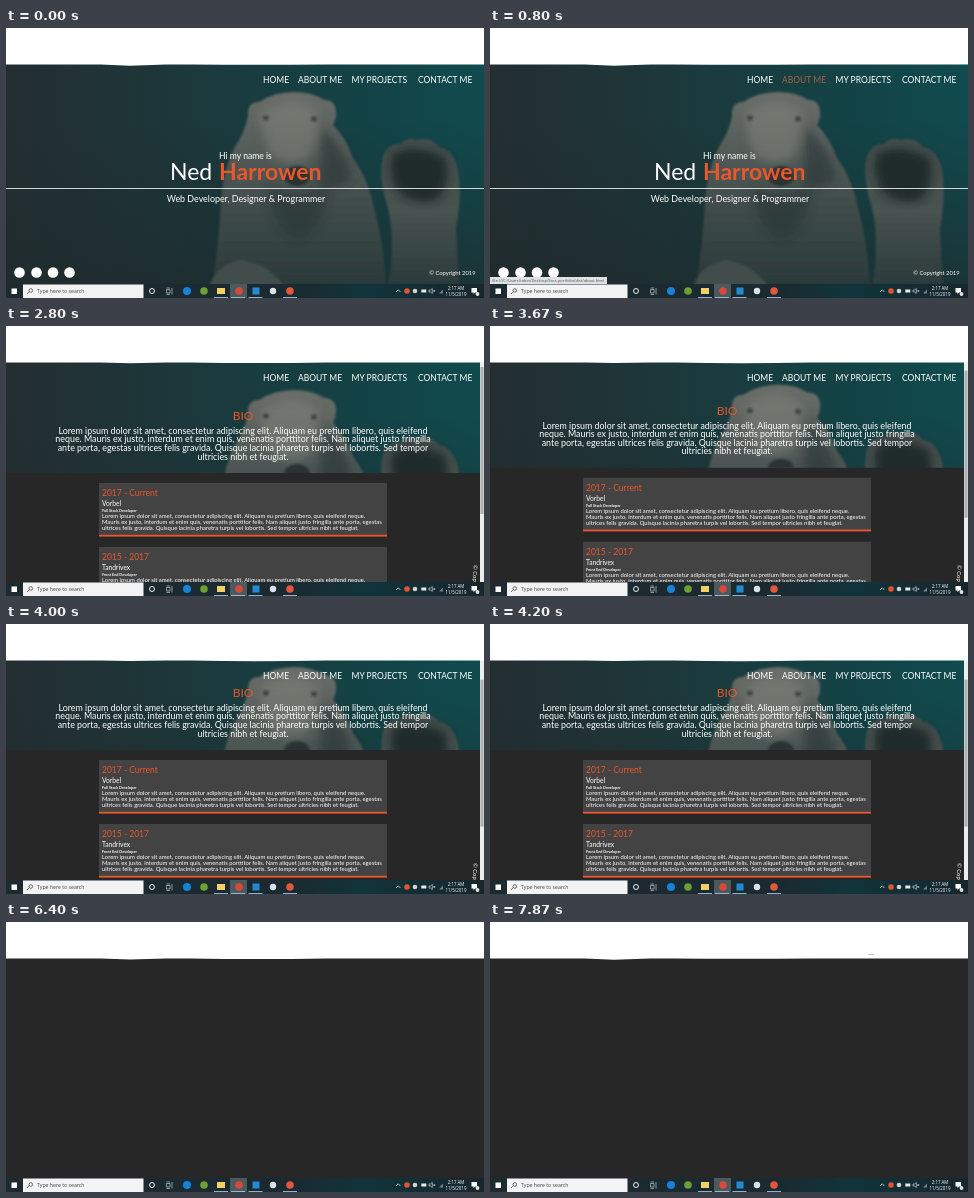
Animation of 478x270 px, one loop 8000 ms. Source, as an HTML page:

```html
<!DOCTYPE html>
<html lang="en">
<head>
<meta charset="utf-8">
<title>Portfolio walkthrough</title>
<style>
html, body { margin: 0; width: 100%; height: 100%; overflow: hidden; background: #272727; }
svg { display: block; width: 100vw; height: 100vh; font-family: Lato, "Open Sans", sans-serif; fill: #fff; }
.ui { font-family: "Open Sans", "Noto Sans", sans-serif; }
</style>
</head>
<body>
<svg id="stage" viewBox="0 0 478 270">
  <defs>
    <linearGradient id="water">
      <stop offset="0" stop-color="#242e31"/>
      <stop offset=".35" stop-color="#1d373a"/>
      <stop offset=".75" stop-color="#134346"/>
      <stop offset="1" stop-color="#104b4e"/>
    </linearGradient>
    <linearGradient id="depth" x2="0" y2="1">
      <stop offset=".25" stop-color="#1e2a2c" stop-opacity="0"/>
      <stop offset="1" stop-color="#1e2a2c" stop-opacity=".7"/>
    </linearGradient>
    <linearGradient id="fur" x2="0" y2="1">
      <stop offset="0" stop-color="#6a6e69"/>
      <stop offset=".35" stop-color="#505956"/>
      <stop offset=".65" stop-color="#3d4948"/>
      <stop offset="1" stop-color="#2b393a"/>
    </linearGradient>
    <linearGradient id="arm" x2="0" y2="1">
      <stop offset="0" stop-color="#454f4d"/>
      <stop offset=".5" stop-color="#48524f"/>
      <stop offset="1" stop-color="#2b3a3b"/>
    </linearGradient>
    <linearGradient id="bar">
      <stop offset="0" stop-color="#1d2a30"/>
      <stop offset=".6" stop-color="#1a2a30"/>
      <stop offset=".75" stop-color="#10343a"/>
      <stop offset="1" stop-color="#17262d"/>
    </linearGradient>
    <filter id="soft" x="-20%" y="-20%" width="140%" height="140%"><feGaussianBlur stdDeviation="1.2"/></filter>
    <filter id="haze" x="-30%" y="-30%" width="160%" height="160%"><feGaussianBlur stdDeviation="5"/></filter>
    <clipPath id="view"><path d="M0 36H478V256H0z"/></clipPath>
    <clipPath id="banner"><path d="M0 36H478V147H0z"/></clipPath>
    <g id="photo">
      <path fill="url(#water)" d="M0 36H478V256H0z"/>
      <path fill="url(#depth)" d="M0 36H478V256H0z"/>
      <g filter="url(#soft)">
        <path fill="url(#fur)" d="M242 88Q241 74 253 74Q268 64 288 64Q306 64 318 72Q328 71 330 82Q331 90 327 97Q340 110 347 130Q362 150 368 180Q378 215 380 258H206Q213 215 215 175Q217 140 230 117Q239 104 242 88z"/>
        <path fill="url(#arm)" d="M382 258Q390 215 382 180Q372 150 377 128Q382 115 394 116Q400 109 411 112Q424 108 433 119Q447 121 452 142Q456 170 450 200L453 258z"/>
        <path fill="#4b5653" opacity=".7" d="M203 258Q210 238 235 232Q262 236 278 258z"/>
      </g>
      <g filter="url(#haze)">
        <path fill="#83857d" opacity=".5" d="M256 84Q288 64 312 84Q312 115 300 132Q280 140 266 128Q254 108 256 84z"/>
        <path fill="#263233" opacity=".6" d="M314 98Q340 120 346 150Q330 165 312 156Q318 125 314 98z"/>
        <path fill="#263233" opacity=".5" d="M262 158Q290 175 322 158Q320 200 292 212Q264 200 262 158z"/>
        <path fill="#1b2527" opacity=".85" d="M386 126Q410 114 440 130Q446 158 430 172Q404 178 390 160Q382 144 386 126z"/>
      </g>
      <g filter="url(#soft)" fill="#20292a">
        <ellipse cx="291" cy="148" rx="13" ry="10" opacity=".75"/>
        <ellipse cx="260" cy="90" rx="3" ry="2.5" opacity=".6"/>
        <ellipse cx="308" cy="91" rx="3" ry="2.5" opacity=".6"/>
      </g>
    </g>
  </defs>
  <path fill="#272727" d="M0 0H478V270H0z"/>
  <g clip-path="url(#view)">
    <g id="home"><use href="#photo"/><path fill-opacity=".8" d="M0 160H478V161H0z"/></g>
    <g id="about"><g id="scroll"><use href="#photo" clip-path="url(#banner)"/></g></g>
    <g id="nav"></g>
    <g id="track"><path fill="#eceeee" d="M474 36H478V256H474z"/><rect id="thumb" x="474.4" width="3.2" height="147" fill="#aeb1b1"/></g>
    <g id="status" class="ui"><path fill="#dfe1e2" d="M0 249H117V256H0z"/></g>
  </g>
  <path id="edge"/>
  <path id="dash" stroke="#aaa" stroke-width=".7" d="M378 32.5H384"/>
  <g id="task" class="ui"><path fill="url(#bar)" d="M0 256H478V270H0z"/></g>
</svg>
<script>
const LOOP = 8000, ORANGE = '#e9572b', SVG = 'http://www.w3.org/2000/svg';
const ABOUT_AT = 2100, PROJECTS_AT = 5650;
const $ = id => document.getElementById(id);

function add(parent, tag, attrs, content) {
  const el = document.createElementNS(SVG, tag);
  for (const k in attrs) el.setAttribute(k, attrs[k]);
  if (content) el.textContent = content;
  return parent.appendChild(el);
}
const text = (parent, x, y, size, str, more) =>
  add(parent, 'text', { x, y, 'font-size': size, ...more }, str);
const rect = (parent, x, y, width, height, fill) =>
  add(parent, 'rect', { x, y, width, height, fill });
const dot = (parent, cx, cy, r, fill) => add(parent, 'circle', { cx, cy, r, fill });
const line = (parent, d, stroke, width) =>
  add(parent, 'path', { d, fill: 'none', stroke, 'stroke-width': width });
const mid = { 'text-anchor': 'middle' };

// Home page
const home = $('home');
text(home, 213, 131, 8.6, 'Hi my name is');
text(home, 164, 152, 23, 'Ned');
text(home, 213, 152, 23, 'Harrowen', { fill: ORANGE, 'font-weight': 700 });
text(home, 240, 173.7, 8.9, 'Web Developer, Designer & Programmer', mid);
text(home, 469.5, 247, 5.8, '© Copyright 2019', { 'text-anchor': 'end' });
[13.5, 30.5, 47, 63.5].forEach(x => dot(home, x, 244.5, 5.3, '#fff'));

// About page
const page = $('scroll');
text(page, 237, 94, 12, 'BIO', { ...mid, fill: ORANGE });
[
  'Lorem ipsum dolor sit amet, consectetur adipiscing elit. Aliquam eu pretium libero, quis eleifend',
  'neque. Mauris ex justo, interdum et enim quis, venenatis porttitor felis. Nam aliquet justo fringilla',
  'ante porta, egestas ultrices felis gravida. Quisque lacinia pharetra turpis vel lobortis. Sed tempor',
  'ultricies nibh et feugiat.'
].forEach((str, i) => text(page, 237, 107.8 + i * 8.6, 8.9, str, mid));

const blurb = [
  'Lorem ipsum dolor sit amet, consectetur adipiscing elit. Aliquam eu pretium libero, quis eleifend neque.',
  'Mauris ex justo, interdum et enim quis, venenatis porttitor felis. Nam aliquet justo fringilla ante porta, egestas',
  'ultrices felis gravida. Quisque lacinia pharetra turpis vel lobortis. Sed tempor ultricies nibh et feugiat.'
];
[
  ['2017 - Current', 'Vorbel', 'Full Stack Developer'],
  ['2015 - 2017', 'Tandrivex', 'Front End Developer'],
  ['2012 - 2015', 'Orl Velden Co.', 'Graphic Designer']
].forEach(([years, firm, role], i) => {
  const y = 157 + i * 64;
  rect(page, 93, y, 288, 53, '#434343');
  rect(page, 93, y + 51.8, 288, 1.8, ORANGE);
  text(page, 96, y + 13, 8.5, years, { fill: ORANGE });
  text(page, 96, y + 23, 6.7, firm);
  text(page, 96, y + 29, 3.8, role, { 'font-weight': 700 });
  blurb.forEach((str, n) => text(page, 96, y + 35.4 + n * 5.7, 5.88, str));
});
[288, 304, 319.5, 335.5].forEach(y => dot(page, 13.5, y, 5.3, '#fff'));
text($('about'), 0, 0, 5.8, '© Copyright 2019', { transform: 'translate(466.5 239)rotate(90)' });

// Navigation and link preview
const links = [[257, 'HOME'], [292, 'ABOUT ME'], [345.5, 'MY PROJECTS'], [412, 'CONTACT ME']]
  .map(([x, label]) => text($('nav'), x, 54.6, 8.5, label));
const url = text($('status'), 2, 254.2, 4, '', { fill: '#555' });

// Taskbar
const task = $('task');
rect(task, 5.5, 260.5, 5.5, 5.5, '#fff');
rect(task, 17, 256.5, 120.5, 13.5, '#f3f3f3');
line(task, 'M21 266L23.2 263.6M23 262.5a1.8 1.8 0 1 1 3.6 0a1.8 1.8 0 1 1-3.6 0', '#333', .7);
text(task, 31, 265.2, 5.2, 'Type here to search', { fill: '#444' });
line(task, 'M143.5 263a2.5 2.5 0 1 1 5 0a2.5 2.5 0 1 1-5 0', '#fff', .9);
line(task, 'M160.5 261.5h3.5v3.5h-3.5zM160.5 260h3.5M160.5 266.5h3.5M166 260v6.5', '#ddd', .6);
rect(task, 224, 256, 17, 14, '#4c595d');
dot(task, 181, 263, 4, '#1681d6');
dot(task, 198, 263, 3.8, '#6f9f32');
rect(task, 211, 260, 8, 6, '#f3cf66');
dot(task, 233, 263, 3.8, '#d8493a');
rect(task, 246.5, 259.5, 7, 7, '#2489d0');
dot(task, 267, 263, 3.2, '#d9e2e6');
dot(task, 284, 263, 3.8, '#e0573c');
[208, 225, 242.5, 277].forEach(x => rect(task, x, 269.1, 14, .9, '#9cc6df'));
line(task, 'M390 264l2.2-2.2 2.2 2.2', '#fff', .7);
dot(task, 401, 263, 2.8, '#e2532f');
dot(task, 409, 263, 2.3, '#d8cfcf');
rect(task, 415.3, 261.5, 5, 3, '#e8eaea');
line(task, 'M423 262h1.5l1.8-1.5v5l-1.8-1.5h-1.5zM427.5 262l1.5 2m0-2l-1.5 2', '#e8eaea', .6);
add(task, 'path', { d: 'M433 265.5l4-4v4z', fill: '#6f8085' });
text(task, 450, 261.6, 4.4, '2:17 AM', mid);
text(task, 450, 268, 4.4, '11/5/2019', mid);
add(task, 'path', { d: 'M465.5 260h5.5v4.5h-2l-1.5 1.7v-1.7h-2z' });
dot(task, 471.5, 266, 1.9, '#dfe5e7');

const clamp = v => Math.max(0, Math.min(1, v));
const ease = (t, from, to) => {
  const p = clamp((t - from) / (to - from));
  return p * p * (3 - 2 * p);
};
const show = (id, on) => $(id).setAttribute('visibility', on ? 'visible' : 'hidden');

function hover(link, p) {
  const mix = [169, 96, 63].map(c => Math.round(255 + (c - 255) * p));
  link.setAttribute('fill', `rgb(${mix})`);
  link.setAttribute('opacity', 1 - .4 * Math.sin(Math.PI * p));
}

function draw(t) {
  const onHome = t < ABOUT_AT, onAbout = !onHome && t < PROJECTS_AT;
  show('home', onHome);
  show('about', onAbout);
  show('track', onAbout);
  show('nav', onHome || onAbout);

  const y = 21 * ease(t, 3560, 3900) + 36 * ease(t, 4400, 4680) + 36 * ease(t, 4680, 5000);
  page.setAttribute('transform', `translate(0 ${-y})`);
  $('thumb').setAttribute('y', 41 + y * .7);

  hover(links[1], onHome ? clamp((t - 400) / 300) : 0);
  hover(links[2], clamp((t - 5050) / 300));
  show('status', (onHome && t > 750) || (onAbout && t > 5300));
  url.textContent = `file:///C:/Users/tobin/Desktop/Sass-portfolio/dist/${onHome ? 'about' : 'projects'}.html`;

  // The torn lower edge of the white strip shifts slightly
  const sway = .4 * Math.cos(t / LOOP * 2 * Math.PI);
  $('edge').setAttribute('d',
    `M0 0H478V36.4H320Q250 ${37.6 - sway} 185 36.4H160L124 ${37.4 + sway}L95 36.4H0z`);
  show('dash', t > 7800);
}

function tick() {
  draw(performance.now() % LOOP);
  requestAnimationFrame(tick);
}
tick();
</script>
</body>
</html>
```
